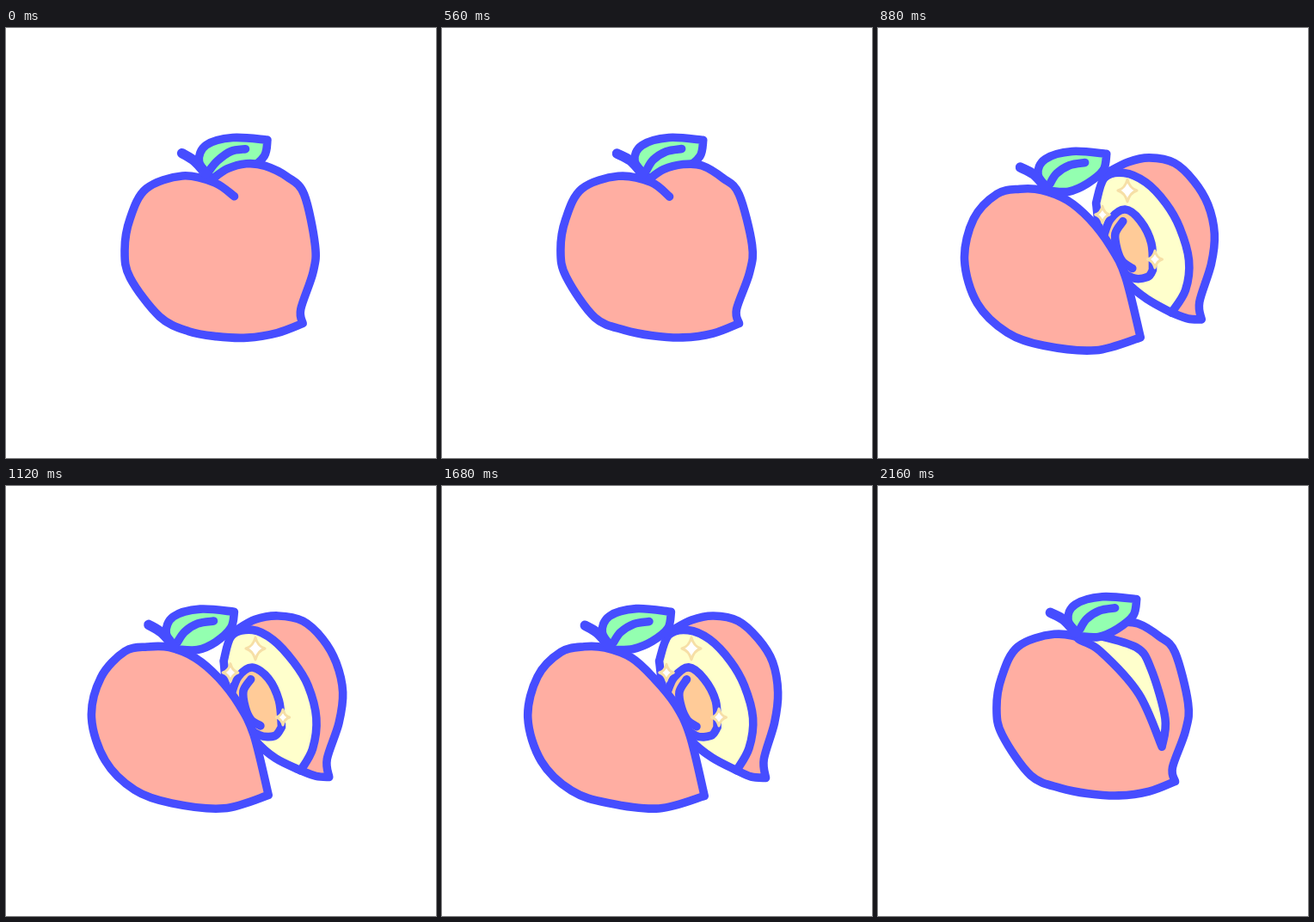
An HTML page that plays this animation: 500 px wide and 500 px high, repeating every 2.24 s.

```html
<!DOCTYPE html>
<html lang="en">
<head>
<meta charset="utf-8">
<title>Peach</title>
<style>
  html, body { margin: 0; width: 100%; height: 100%; overflow: hidden; background: #fff; }
  svg { display: block; width: 100%; height: 100%; }
  path { stroke: #464dff; stroke-width: 9.6; stroke-linecap: round; stroke-linejoin: round; fill: none; }
  .body, .outer, .front { fill: #ffaea2; }
  .face, .gap { fill: #ffffcc; }
  .seed { fill: #ffcb98; }
  .leaf { fill: #93ffb0; }
  .stem { stroke-width: 11.5; }
  .star { fill: #fff; stroke: #f6dfa6; stroke-width: 3; }
</style>
</head>
<body>
<svg id="stage" viewBox="0 0 500 500"></svg>
<script>
const STEP = 80, STEPS = 28, OPENING = 8, WOBBLE = 0.7;
const stage = document.getElementById('stage');

// Key points of smooth curves; a slash marks a corner.
const shapes = {
  body: '265,196 243,180 205,172 163,187 144,222 138,258 145,290 178,336 212,352 245,358 280,360 315,355 345,344 / 343,327 357,284 360,252 346,194 327,174 302,160 280,158 258,164 240,176',
  gap: '330,303 334,270 318,212 300,188 250,172 / 232,178 258,192 303,242 330,303',
  outer: '266,168 290,156 316,151 345,157 368,178 384,205 391,240 387,275 374,318 376,339 / 360,338 342,331',
  face: '342,331 357,305 361,270 351,232 335,204 311,179 286,168 263,174 253,204 / 262,258 290,296 314,316 342,331',
  seed: '262,242 270,222 287,211 305,224 318,250 320,281 / 313,290 295,290 278,275 262,242',
  shine: '285,225 276,239 278,258 285,272 296,279',
  front: '305,360 253,375 193,369 150,354 115,320 100,270 111,222 138,193 165,187 190,188 220,200 247,223 271,254 288,290 305,360',
  leaf: '200,190 186,171 195,152 226,143 266,146 / 262,165 244,181 222,190 200,190',
  vein: '199,182 208,170 223,160 241,157',
  stem: '166,162 181,171 195,186'
};

const random = n => {
  const x = Math.sin(n) * 43758.5453;
  return x - Math.floor(x);
};

// The hand-drawn look: every point strays a little on each beat.
const stray = (x, y, beat) => (random(x * 12.9 + y * 78.2 + beat * 37.7) * 2 - 1) * WOBBLE;

function spline(points) {
  const last = points.length - 1;
  const handle = (i, sign) => {
    const a = points[Math.max(i - 1, 0)], b = points[Math.min(i + 1, last)];
    return points[i].map((v, axis) => v + sign * (b[axis] - a[axis]) / 6);
  };
  return points.slice(1).map((p, i) => `C${handle(i, 1)} ${handle(i + 1, -1)} ${p}`).join('');
}

function draw(name, beat, dx = 0, dy = 0) {
  const runs = shapes[name].split(' / ').map(run => run.split(' ').map(pair => {
    const [x, y] = pair.split(',').map(Number);
    return [x + dx + stray(x, y, beat), y + dy + stray(y, x, beat)];
  }));
  let d = 'M' + runs[0][0];
  runs.forEach((run, i) => {
    d += spline(i ? [runs[i - 1].at(-1), ...run] : run);
  });
  return `<path class="${name}" d="${d}"/>`;
}

function star(x, y, r) {
  const w = r * 0.85, k = r * 0.2;
  return `<path class="star" d="M${x},${y - r}Q${x + k},${y - k} ${x + w},${y}Q${x + k},${y + k} ${x},${y + r}` +
    `Q${x - k},${y + k} ${x - w},${y}Q${x - k},${y - k} ${x},${y - r}Z"/>`;
}

function stars(beat) {
  const twinkle = Math.cos(beat * Math.PI / 2);
  return star(290, 189, 13) + star(261, 217, 9.7 - twinkle * 0.7) + star(322, 269, 10 + twinkle);
}

function picture(step) {
  const beat = step % 4;
  // Steps since the cut opened or until it shuts, whichever is nearer.
  const near = Math.min(step - OPENING, STEPS - 1 - step);
  const shut = near < 0 ? 1 : 0.92 * Math.max(0, 1 - near / 3) ** 2;

  const group = (names, dx, dy) => names.map(name => draw(name, beat, dx, dy)).join('');
  const left = names => group(names, 38 * shut, -16 * shut);
  const right = names => group(names, -34 * shut, 0);

  if (near < 0) return left(['leaf', 'vein']) + group(['body']) + left(['stem']);
  const sprig = left(['leaf', 'vein', 'stem']);
  if (near === 0) return group(['body', 'gap']) + sprig;
  return right(['outer', 'face', 'seed', 'shine']) + left(['front']) + sprig + (near > 2 ? stars(beat) : '');
}

const start = performance.now();
let shown = -1;
function update() {
  const step = Math.floor((performance.now() - start) / STEP) % STEPS;
  if (step !== shown) stage.innerHTML = picture(shown = step);
  requestAnimationFrame(update);
}
update();
</script>
</body>
</html>
```
